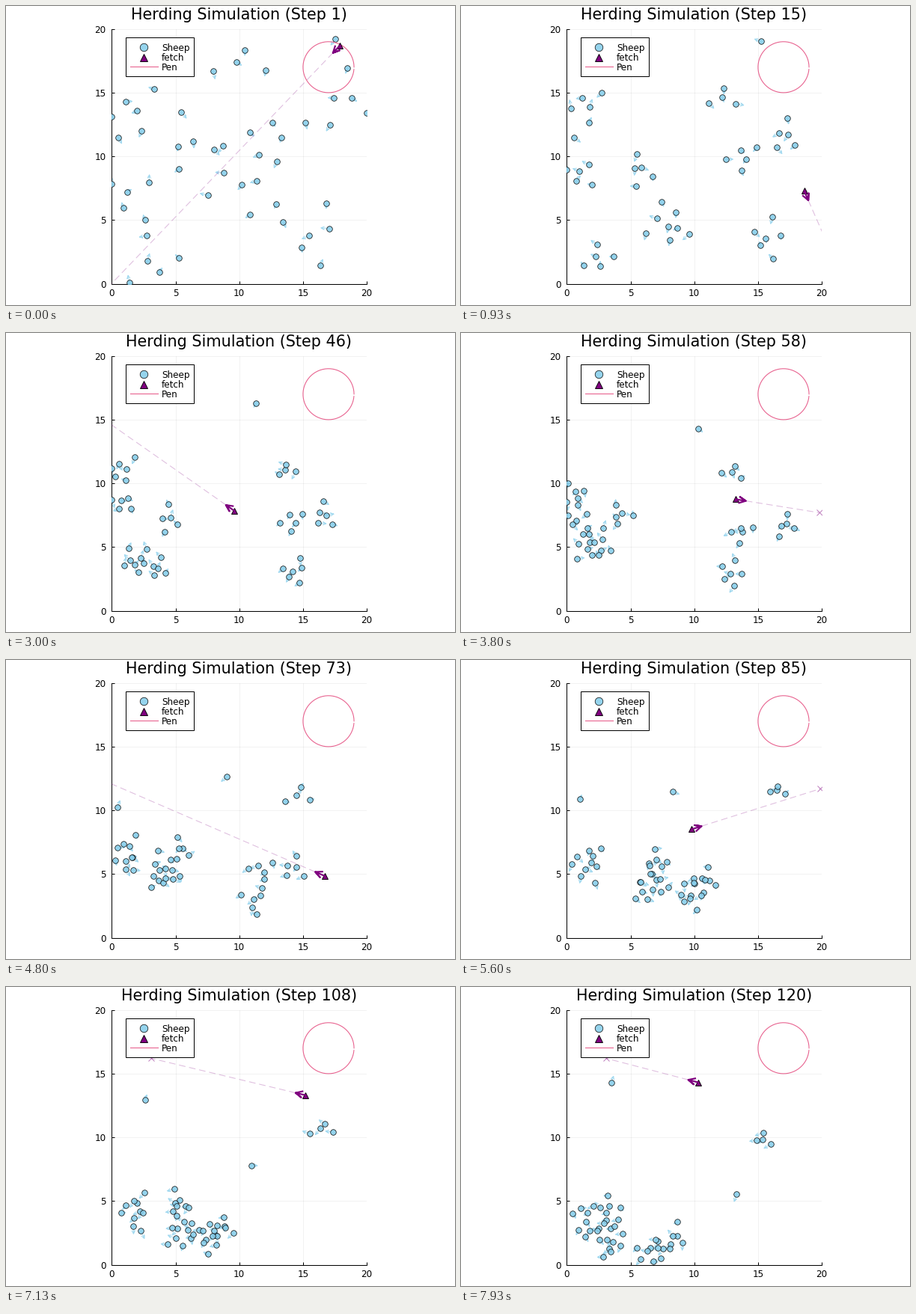
Animation, 600 px wide and 400 px high, one loop 8 s. Source, as a matplotlib script:

```python
import numpy as np
import matplotlib.pyplot as plt
from matplotlib.animation import FuncAnimation
from matplotlib.patches import Rectangle

STEPS = 120
TICKS = 2 * STEPS  # two drawn frames per simulation step
LOOP_MS = 8000
SIZE = 20
PX = 0.72  # points per pixel at 100 dpi
SKY, PEN, DOG = "#87ceeb", "#e8628f", "#800080"

plt.rcParams["font.family"] = "DejaVu Sans"

# Flock size and the places its centre passes, evenly spaced over the loop
FLOCKS = [
    (5, [(2, 13.6), (1.6, 13.6), (.9, 8.4), (2.2, 6), (1.6, 4)]),
    (5, [(6.4, 11.2), (5.3, 7.3), (4.4, 7.6), (7.2, 5.8), (3.2, 4.6)]),
    (5, [(1.2, 7.2), (.8, 10), (.8, 6.8), (1.6, 5), (1.8, 2.6)]),
    (5, [(2.8, 1.8), (1.8, 2.7), (1.8, 4.9), (6.4, 3.2), (3.2, 1.2)]),
    (8, [(10.2, 7.8), (5.6, 1.9), (2.2, 5.6), (7.6, 4.2), (3.3, 2.8)]),
    (4, [(9.8, 17.4), (14.2, 12), (13, 10.9), (17, 11.6), (15.3, 9.8)]),
    (5, [(13.3, 11.5), (14.6, 8), (13.5, 6), (9.3, 3.8), (7.5, 1.2)]),
    (5, [(18.8, 14.6), (16.1, 8.8), (17, 6.6), (10, 4), (8.6, 2.2)]),
    (6, [(15.5, 3.8), (15.4, 3.3), (12.5, 2.9), (9, 3), (6.2, 1)]),
    (1, [(17.5, 19.2), (12.9, 18.4), (10.1, 13.9), (8.4, 10.7), (13.5, 5.4)]),
    (1, [(.5, 11.5), (.6, 11.3), (.1, 10), (1.4, 11.3), (3.6, 14.4)]),
]

# Legs of the dog's run: start step, place, and the goal it heads for
LEGS = np.array([
    (0, 17.9, 18.7, -.6, -.6),
    (2, 17, 17.8, 20.5, 3),
    (19, 19.3, 2.9, 16, -.6),
    (34, 16.35, 3.93, -.6, 15),
    (46, 9, 8.2, 19.8, 7.7),
    (57, 13.25, 8.75, 19.8, 7.7),
    (66, 18.5, 7.6, -1, 12.5),
    (72, 16.7, 4.85, -1, 12.5),
    (83, 9, 8.2, 19.9, 11.7),
    (96.2, 19.6, 12.4, 3.1, 16.2),
    (120, 9.9, 14.4, 3.1, 16.2)])

rng = np.random.default_rng(7)


def smooth(u):
    u = np.clip(u, 0, 1)
    return u * u * (3 - 2 * u)


def spline(points, u):
    """Smooth curve through the points, u running from 0 to 1."""
    p = np.array(points, float)
    slope = np.gradient(p, axis=0)
    s = np.clip(u, 0, 1) * (len(p) - 1)
    i = np.minimum(s.astype(int), len(p) - 2)
    f = (s - i)[:, None]
    return ((1 - smooth(f)) * p[i] + smooth(f) * p[i + 1]
            + f * (1 - f) ** 2 * slope[i] - f * f * (1 - f) * slope[i + 1])


def walk():
    """Place of every sheep at every step: flock path, own spot, wander."""
    t = np.arange(STEPS + 1)
    loose = 0.52 + 0.75 * (1 - smooth(t / 22))
    paths = []
    for flock, (count, stops) in enumerate(FLOCKS):
        centre = spline(stops, t / STEPS)
        for k in range(count):
            a = 2.4 * k + flock
            spot = np.sqrt(k) * np.array([np.cos(a), np.sin(a)])
            beat = 2 * np.pi * t[:, None] / rng.uniform(18, 40, 2)
            stray = 0.2 * np.sqrt(min(k, 1)) * np.sin(
                beat + rng.uniform(0, 2 * np.pi, 2))
            paths.append(centre + loose[:, None] * spot + stray)
    return np.clip(np.stack(paths, axis=1), 0, SIZE)


def arrows(base, vec, barb, spread=0.45):
    """Open-headed arrows as one broken line."""
    tip = base + vec
    angle = np.arctan2(vec[:, 1], vec[:, 0]) + np.pi

    def head(a):
        return tip + barb * np.column_stack([np.cos(a), np.sin(a)])

    gap = np.full_like(base, np.nan)
    line = [base, tip, head(angle - spread), tip, head(angle + spread), gap]
    return np.stack(line, axis=1).reshape(-1, 2).T


sheep_path = walk()
count = sheep_path.shape[1]
turn = rng.normal(0, 0.7, (STEPS, count))
reach = rng.uniform(0.3, 0.65, (STEPS, count))

fig = plt.figure(figsize=(6, 4), dpi=100, facecolor="white")
ax = fig.add_axes([141.3 / 600, 1 - 371.6 / 400, 340.8 / 600, 340.9 / 400])
ax.set(xlim=(0, SIZE), ylim=(0, SIZE),
       xticks=range(0, 21, 5), yticks=range(0, 21, 5))
ax.set_axisbelow(True)
ax.grid(color="black", alpha=0.1, lw=0.5 * PX)
ax.tick_params(direction="in", length=4 * PX, width=PX, labelsize=12 * PX)
ax.tick_params(axis="x", pad=6.5 * PX)
ax.tick_params(axis="y", pad=8 * PX)
ax.spines[["top", "right"]].set_visible(False)
ax.spines[["left", "bottom"]].set_linewidth(PX)
title = fig.text(311.5 / 600, 1 - 18.4 / 400, "", fontsize=20.8 * PX,
                 ha="center", va="baseline")

sheep_style = dict(ls="", marker="o", mfc=SKY, mec="black", mew=0.8 * PX,
                   alpha=0.88)
dog_style = dict(ls="", marker="^", mfc=DOG, mec="black", mew=0.9 * PX)

theta = np.arange(0, 2 * np.pi, 0.1)
headings, = ax.plot([], [], color=SKY, alpha=0.75, lw=PX, zorder=2)
sheep, = ax.plot([], [], ms=7.6 * PX, zorder=3, **sheep_style)
ax.plot(17 + 2 * np.cos(theta), 17 + 2 * np.sin(theta), color=PEN,
        lw=1.1 * PX, zorder=4)
trail, = ax.plot([], [], color=DOG, alpha=0.25, lw=1.1 * PX, zorder=5,
                 dashes=(8, 4.5))
goal, = ax.plot([], [], ls="", marker="x", color=DOG, alpha=0.5, ms=8 * PX,
                mew=PX, zorder=5)
dog, = ax.plot([], [], ms=8 * PX, zorder=6, **dog_style)
dog_arrow, = ax.plot([], [], color=DOG, lw=2.2 * PX, zorder=7)

# Legend, laid out in pixels
key = fig.add_axes([0, 0, 1, 1])
key.set(xlim=(0, 600), ylim=(400, 0))
key.axis("off")
key.add_patch(Rectangle((159.5, 41.5), 91, 52, fc="white", ec="black", lw=PX))
key.plot(184.3, 55.3, ms=10.5 * PX, **sheep_style)
key.plot(184.3, 68.6, ms=10.5 * PX, **dog_style)
key.plot([165.5, 203], [81.3, 81.3], color=PEN, lw=1.1 * PX)
for row, label in enumerate(("Sheep", "fetch", "Pen")):
    key.text(208, 59.8 + 13 * row, label, fontsize=12 * PX, va="baseline")


def draw(tick):
    i = min((tick + 1) // 2, STEPS - 1)
    title.set_text(f"Herding Simulation (Step {i + 1})")

    here = sheep_path[i]
    step = sheep_path[i + 1] - here
    angle = np.arctan2(step[:, 1], step[:, 0]) + turn[i]
    vec = reach[i][:, None] * np.column_stack([np.cos(angle), np.sin(angle)])
    sheep.set_data(*here.T)
    headings.set_data(*arrows(here, vec, 0.26))

    start = LEGS[:, 0]
    pos = np.array([np.interp(i, start, LEGS[:, c]) for c in (1, 2)])
    target = LEGS[start <= i][-1, 3:]
    ahead = target - pos
    ahead *= 0.8 / np.hypot(*ahead)
    dog.set_data([pos[0]], [pos[1]])
    dog_arrow.set_data(*arrows(pos[None], ahead[None], 0.55))
    trail.set_data([pos[0], target[0]], [pos[1], target[1]])
    goal.set_data([target[0]], [target[1]])
    return title, sheep, headings, dog, dog_arrow, trail, goal


anim = FuncAnimation(fig, draw, frames=TICKS, interval=LOOP_MS / TICKS,
                     init_func=lambda: draw(0), repeat=True, repeat_delay=0,
                     blit=False)
plt.show()
```
